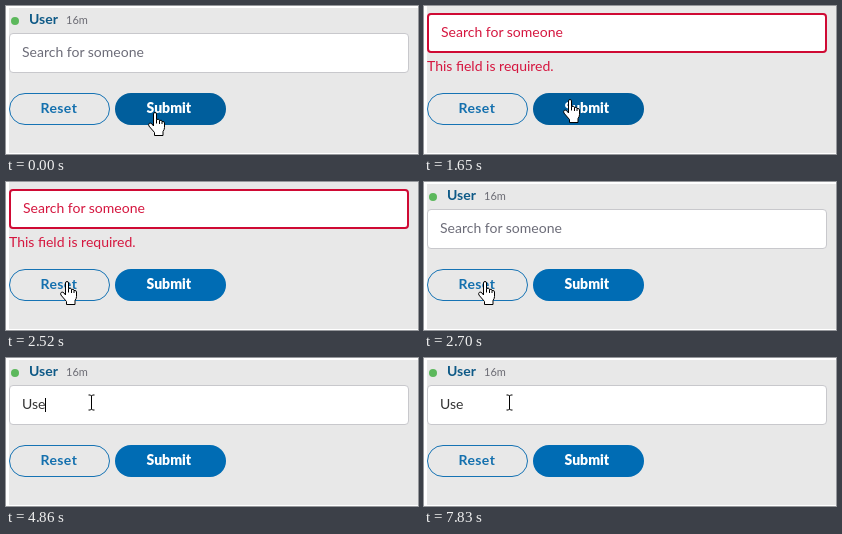
Write an HTML page that moves like this. It is 412 px wide and 148 px high and loops after 8000 ms.

```html
<!DOCTYPE html>
<html lang="en">
<head>
<meta charset="utf-8">
<title>Search form</title>
<style>
html, body { margin: 0; width: 100%; height: 100%; overflow: hidden; background: #fff; }
svg { display: block; width: 412px; height: 148px; font: 14px Lato, sans-serif; }
.button { font-weight: 700; letter-spacing: .4px; }
.pointer path { stroke: #000; stroke-linejoin: round; }
</style>
</head>
<body>
<svg viewBox="0 0 412 148">
  <rect id="panel" x="3" width="409" fill="#e8e8e8"/>

  <g id="label">
    <circle cx="9" cy="15" r="4" fill="#5cb85c"/>
    <text x="23" y="18" font-weight="700" fill="#0f5a87">User</text>
    <text x="60" y="18" font-size="11" fill="#6c6c74">16m</text>
  </g>

  <g id="idle">
    <rect x="3.5" y="27.5" width="399" height="39" rx="3.5" fill="#fff" stroke="#c8c8cc"/>
    <text x="16" y="51" id="hint" fill="#6c6c78">Search for someone</text>
    <text x="16" y="51" id="typed" fill="#333"></text>
    <rect id="caret" y="40" width="1" height="14" fill="#000"/>
  </g>

  <g id="error" fill="#d5163f">
    <rect x="4" y="8" width="398" height="38" rx="3" fill="#fff" stroke="#cf0a34" stroke-width="2"/>
    <text x="17" y="31">Search for someone</text>
    <text x="3" y="65">This field is required.</text>
  </g>

  <g class="button">
    <rect x="3.5" y="87.5" width="100" height="31" rx="15.5" fill="none" stroke="#1673b4"/>
    <text x="34.5" y="107" fill="#1470ae">Reset</text>
    <rect id="submit" x="109" y="87" width="111" height="32" rx="16"/>
    <text x="140.5" y="107" fill="#fff" font-weight="900" letter-spacing="0">Submit</text>
  </g>

  <g class="pointer" id="hand">
    <path fill="#fff" d="M5.5 14V2Q5.5 .5 7 .5T8.5 2V7.5Q11.5 6.5 11.5 8.5Q14 7.5 14 9.5Q16.5 9 16.5 11V15.5Q16.5 17.5 15 19.5V23.5H6.5V20.5L.9 14Q.2 12 1.5 11.2Q3 10.8 4 12Z"/>
    <path fill="none" d="M8.5 7.5V11.5M11.5 8.5V12M14 9.5V12"/>
  </g>
  <g class="pointer" id="arrow">
    <path fill="#fff" d="M.5 .5V16.5L4.2 13L6.6 18.5L9 17.5L6.6 12H11.5Z"/>
  </g>
  <g class="pointer" id="beam">
    <path fill="none" d="M-3 -7.5H-1L0 -6.5L1 -7.5H3M0 -6.5V6.5M-3 7.5H-1L0 6.5L1 7.5H3"/>
  </g>
</svg>
<script>
const LOOP = 8000;
const $ = id => document.getElementById(id);

// Pointer samples: start time, shape, x, y
const moves = [
  [0, 'hand', 142, 106],
  [1650, 'hand', 139, 93],
  [1710, 'arrow', 143, 79],
  [1770, 'arrow', 141, 64],
  [1830, 'arrow', 129, 50],
  [1890, 'beam', 138.5, 40.5],
  [1950, 'beam', 137.5, 36.5],
  [2290, 'beam', 99.5, 68.5],
  [2320, 'arrow', 86, 79],
  [2380, 'hand', 68, 89],
  [2450, 'hand', 58, 96],
  [2520, 'hand', 54, 99],
  [2850, 'hand', 57, 94],
  [2910, 'arrow', 70, 77],
  [2970, 'beam', 79.5, 60.5],
  [3030, 'beam', 83.5, 49.5],
  [3090, 'beam', 85.5, 44.5]
];

// Field contents: start time, text, caret x (0 hides it)
const edits = [
  [0, '', 0], [3330, '', 16], [3860, '', 0],
  [4330, 'U', 26], [4580, 'Us', 32], [4860, 'Use', 39], [5170, 'User', 45],
  [5660, 'User', 0], [6190, 'User', 45], [6250, 'User ', 48], [6750, 'User ', 0],
  [7270, 'User', 45], [7610, 'Use', 39], [7830, 'Use', 0]
];

const at = (list, t) => list.findLast(step => step[0] <= t);
const show = (id, on) => $(id).setAttribute('visibility', on ? 'visible' : 'hidden');
const set = (id, attrs) => {
  for (const key in attrs) $(id).setAttribute(key, attrs[key]);
};

function render(t) {
  const invalid = t >= 120 && t < 2700;
  const top = invalid ? 0 : 2;
  set('panel', { y: top, height: 147 - top });
  set('submit', { fill: t < 1710 ? '#005e9c' : '#006cb4' });

  const [, text, caret] = at(edits, t);
  $('typed').textContent = text;
  set('caret', { x: caret });
  show('label', !invalid);
  show('idle', !invalid);
  show('error', invalid);
  show('hint', !invalid && !text);
  show('typed', !invalid);
  show('caret', !invalid && caret);

  const [, shape, x, y] = at(moves, t);
  for (const id of ['hand', 'arrow', 'beam']) show(id, id === shape);
  set(shape, { transform: `translate(${x} ${y})` });
}

const start = performance.now();
function tick() {
  render((performance.now() - start) % LOOP);
  requestAnimationFrame(tick);
}
render(0);
requestAnimationFrame(tick);
</script>
</body>
</html>
```
